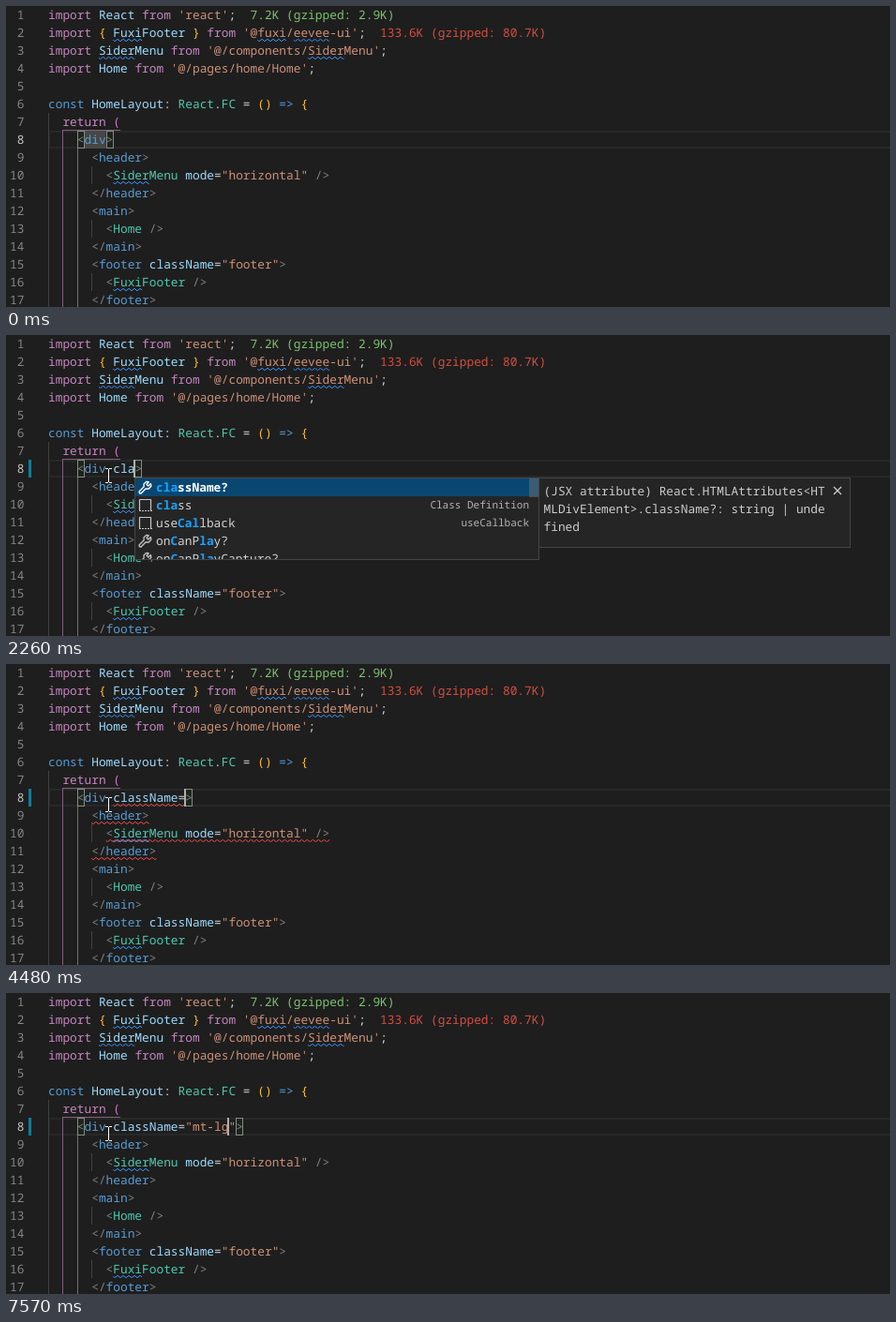
An HTML page with a canvas that plays this animation: 943x321 px, repeating every 8000 ms.

```html
<!DOCTYPE html>
<html lang="en">
<head>
<meta charset="utf-8">
<title>Code editor</title>
<style>
  html, body { margin: 0; width: 100%; height: 100%; overflow: hidden; background: #1e1e1e; }
  canvas { display: block; }
</style>
</head>
<body>
<canvas id="stage" width="943" height="321"></canvas>
<script>
const ctx = document.getElementById('stage').getContext('2d');
ctx.textRendering = 'geometricPrecision';

const LOOP = 8000, ROW = 19, LEFT = 45, CHAR = 7.698, ACTIVE = 7, LIST_WIDTH = 431;
const MONO = '12.83px "Noto Sans Mono", monospace';
const SMALL = '11px "Noto Sans Mono", monospace';
const SANS = '13.4px "Open Sans", sans-serif';
const RED = '#f14c4c', BLUE = '#3794ff';

// "~x" switches to the colour with key x
const COLORS = {
  w: '#d4d4d4', p: '#c586c0', v: '#9cdcfe', s: '#ce9178', k: '#569cd6', t: '#4ec9b0',
  g: '#808080', y: '#ffc029', o: '#da70d6', G: '#7cc36e', R: '#d44e40'
};
const CODE = [
  "~pimport ~vReact ~pfrom ~s'react'~w;  ~G7.2K (gzipped: 2.9K)",
  "~pimport ~y{ ~vFuxiFooter ~y} ~pfrom ~s'@fuxi/eevee-ui'~w;  ~R133.6K (gzipped: 80.7K)",
  "~pimport ~vSiderMenu ~pfrom ~s'@/components/SiderMenu'~w;",
  "~pimport ~vHome ~pfrom ~s'@/pages/home/Home'~w;",
  "",
  "~kconst ~vHomeLayout~w: ~tReact~w.~tFC ~w= ~y() ~k=> ~y{",
  "~w  ~preturn ~o(",
  "",
  "~w      ~g<~kheader~g>",
  "~w        ~g<~tSiderMenu ~vmode~w=~s\"horizontal\" ~g/>",
  "~w      ~g</~kheader~g>",
  "~w      ~g<~kmain~g>",
  "~w        ~g<~tHome ~g/>",
  "~w      ~g</~kmain~g>",
  "~w      ~g<~kfooter ~vclassName~w=~s\"footer\"~g>",
  "~w        ~g<~tFuxiFooter ~g/>",
  "~w      ~g</~kfooter~g>"
];

// "*" toggles the matched part of a label
const CLASS_LIST = [
  ['wrench', '*cla*ssName?'],
  ['snippet', '*cla*ss', 'Class Definition'],
  ['snippet', 'use*Cal*lback', 'useCallback'],
  ['wrench', 'on*C*anP*la*y?'],
  ['wrench', 'on*C*anP*la*yCapture?']
];
const EXACT_LIST = [
  ['snippet', '*class*', 'Class Definition'],
  ['wrench', '*class*Name?']
];
const marginList = mark => ['lg', 'md', 'sm', 'xs', 'xss'].map(size => ['wrench', mark + '-' + size]);

const JSX_INFO = { width: 333, height: 75, font: MONO, close: true, lines: [
  '(JSX attribute) React.HTMLAttributes<HT', 'MLDivElement>.className?: string | unde', 'fined'] };
const SNIPPET_INFO = { width: 333, height: 159, font: MONO, close: true, lines: [
  'Class Definition', 'class name {', '  private value : string;', '  constructor(parameters) {', '', '  }', '}'] };
const CSS_INFO = { width: 400, height: 66, font: SANS, lines: ['{', '    margin-top: 24px;', '}'] };

// Each step changes part of the state; "|" in attr is the caret
const STEPS = [
  [0, { attr: '|', caret: false, word: true, edited: false, errors: 0, list: null, info: null, selected: 0, bar: null }],
  [1080, { caret: true }],
  [1600, { attr: ' |', word: false }],
  [1860, { attr: ' ~vc|', edited: true }],
  [1930, { attr: ' ~vcl|' }],
  [2060, { attr: ' ~vcla|' }],
  [2190, { list: CLASS_LIST, bar: [153, 20] }],
  [2260, { info: JSX_INFO }],
  [2460, { attr: ' ~vclas|' }],
  [2530, { attr: ' ~vclass|' }],
  [2660, { list: EXACT_LIST, info: null, bar: null }],
  [2730, { info: SNIPPET_INFO }],
  [3130, { caret: false }],
  [3330, { selected: 1, info: null, errors: 1 }],
  [3400, { info: JSX_INFO }],
  [3600, { attr: ' ~vclassName|', caret: true, list: null, info: null, selected: 0 }],
  [4080, { caret: false }],
  [4410, { attr: ' ~vclassName~w=|', caret: true }],
  [4480, { errors: 2 }],
  [4810, { attr: ' ~vclassName~w=~s"|"' }],
  [4880, { errors: 3 }],
  [4950, { list: marginList('mt'), bar: [194, 20] }],
  [5020, { info: CSS_INFO }],
  [5430, { caret: false }],
  [5700, { errors: 0 }],
  [5910, { attr: ' ~vclassName~w=~s"m|"', caret: true, list: marginList('*m*t'), bar: [168, 65] }],
  [5980, { attr: ' ~vclassName~w=~s"mt|"', list: marginList('*mt*') }],
  [6460, { caret: false }],
  [7020, { caret: true }],
  [7500, { attr: ' ~vclassName~w=~s"mt-lg|"', list: null, info: null }]
];

const colX = col => LEFT + col * CHAR;
const plain = code => code.replace(/~./g, '');

function rect(x, y, w, h, color) {
  ctx.fillStyle = color;
  ctx.fillRect(x, y, w, h);
}

function text(string, x, y, color, font = MONO, align = 'left') {
  ctx.font = font;
  ctx.fillStyle = color;
  ctx.textAlign = align;
  ctx.fillText(string, x, y);
}

function stroke(points, color, width = 1) {
  ctx.strokeStyle = color;
  ctx.lineWidth = width;
  ctx.beginPath();
  points.forEach(([x, y]) => ctx.lineTo(x, y));
  ctx.stroke();
}

function panel(x, y, w, h) {
  rect(x, y, w, h, '#454545');
  rect(x + 1, y + 1, w - 2, h - 2, '#252526');
}

function squiggle(x0, x1, row, color) {
  const top = row * ROW + 16, points = [];
  for (let i = -1; i * 3 < x1 - x0 + 6; i++) points.push([x0 + 1.75 + i * 3, top + (i & 1 ? 0.3 : 2.7)]);
  ctx.save();
  ctx.beginPath();
  ctx.rect(x0, top, x1 - x0, 3);
  ctx.clip();
  stroke(points, color);
  ctx.restore();
}

function codeLine(code, row) {
  let col = 0;
  for (const part of code.split('~').slice(1)) {
    const token = part.slice(1);
    text(token, colX(col), row * ROW + 14, COLORS[part[0]]);
    col += token.length;
  }
  const visible = plain(code);
  for (const m of visible.matchAll(/Sider|[Ff]uxi|eevee/g))
    squiggle(colX(m.index), colX(m.index + m[0].length), row, BLUE);
}

function guides() {
  rect(45, 6 * ROW, 1, 207, '#404040');
  rect(76, 8 * ROW, 1, 169, '#707070');
  for (const row of [9, 12, 15]) rect(91, row * ROW, 1, ROW, '#404040');
  rect(60, 132, 1, 189, '#80607a');
  rect(60, 132, 62, 1, '#80607a');
}

function bracketBox(col) {
  const x = Math.round(colX(col));
  rect(x, 133, 8, ROW, 'rgba(0,100,0,0.1)');
  ctx.strokeStyle = '#888';
  ctx.lineWidth = 1;
  ctx.strokeRect(x + 0.5, 133.5, 7, 18);
}

function errorMarks(level, caretX) {
  if (level) squiggle(colX(9), caretX, ACTIVE, RED);
  if (level < 2) return;
  for (let row = 8; row < (level === 2 ? 11 : CODE.length); row++) {
    const line = plain(CODE[row]);
    const start = level === 2 || row === 8 ? line.search(/\S/) : 0;
    squiggle(colX(start), colX(line.length), row, RED);
  }
}

function icon(kind, x, y, color) {
  if (kind === 'snippet') {
    stroke([[x + 1.5, y + 13], [x + 1.5, y + 1.5], [x + 13.5, y + 1.5], [x + 13.5, y + 13]], color, 1.2);
    for (let i = 1; i < 14; i += 3) rect(x + i, y + 13, 2, 1, color);
    return;
  }
  ctx.lineJoin = 'round';
  stroke([[x + 11.5, y + 1.6], [x + 8.6, y + 1.4], [x + 6, y + 4], [x + 6.2, y + 6.8], [x + 1, y + 12],
    [x + 1.4, y + 13.8], [x + 3, y + 14], [x + 8.2, y + 8.8], [x + 11.3, y + 9], [x + 13.8, y + 6.2],
    [x + 13.4, y + 3.6], [x + 10.8, y + 6], [x + 9, y + 4.2], [x + 11.5, y + 1.6]], color, 1.3);
}

function suggestions({ list, selected, bar }, x) {
  const bottom = Math.min(240, 154 + list.length * ROW);
  panel(x, 152, LIST_WIDTH + 1, bottom - 152);
  ctx.save();
  ctx.beginPath();
  ctx.rect(x + 1, 153, LIST_WIDTH - 1, bottom - 154);
  ctx.clip();
  list.forEach(([kind, label, note = ''], i) => {
    const y = 153 + i * ROW, focused = i === selected;
    if (focused) rect(x, y, LIST_WIDTH, ROW, '#094771');
    icon(kind, x + 4, y + 2, focused ? '#fff' : '#c5c5c5');
    let col = 0;
    label.split('*').forEach((part, j) => {
      const match = j % 2;
      text(part, x + 23 + col * CHAR, y + 14, match ? '#18a3ff' : focused ? '#fff' : '#d4d4d4',
        match || focused ? 'bold ' + MONO : MONO);
      col += part.length;
    });
    text(note, x + 421, y + 13, '#b4b4b4', SMALL, 'right');
  });
  if (bar) rect(x + LIST_WIDTH - 10, bar[0], 10, bar[1], bar[0] === 194 ? 'rgba(121,121,121,0.15)' : 'rgba(121,121,121,0.45)');
  ctx.restore();
}

function details({ width, height, font, close, lines }, x) {
  panel(x, 152, width, height);
  lines.forEach((line, i) => text(line, x + 5.5, 171 + i * ROW, '#ccc', font));
  if (!close) return;
  const cx = x + 319;
  stroke([[cx - 4, 162], [cx + 4, 170]], '#ccc', 1.2);
  stroke([[cx + 4, 162], [cx - 4, 170]], '#ccc', 1.2);
}

function pointer(t) {
  if (t < 130) return;
  const k = Math.min(11, Math.floor((t - 130) / 68)) / 11;
  const rest = (1 - k) ** 2;
  const x = Math.round(109 + 369 * rest), y = Math.round(142 + 119 * rest);
  rect(x, y + 1, 1, 14, '#fff');
  for (const end of [y, y + 15]) {
    rect(x - 3, end, 3, 1, '#fff');
    rect(x + 1, end, 3, 1, '#fff');
  }
}

function draw(t) {
  const state = Object.assign({}, ...STEPS.filter(([at]) => at <= t).map(([, change]) => change));
  const marked = '~w    ~g<~kdiv' + state.attr + '~g>';
  const active = marked.replace('|', '');
  const caretX = colX(plain(marked).indexOf('|'));

  rect(0, 0, 943, 321, '#1e1e1e');
  ctx.strokeStyle = '#282828';
  ctx.lineWidth = 2;
  ctx.strokeRect(46, 134, 910, 17);
  guides();
  if (state.edited) rect(24, 133, 3, ROW, '#0c7d9d');
  if (state.word) rect(colX(5), 133, 3 * CHAR, ROW, 'rgba(87,87,87,0.72)');
  bracketBox(4);
  bracketBox(plain(active).length - 1);
  CODE.forEach((code, row) => {
    text(row + 1, 19.5, row * ROW + 14, row === ACTIVE ? '#c6c6c6' : '#858585', MONO, 'right');
    codeLine(row === ACTIVE ? active : code, row);
  });
  errorMarks(state.errors, caretX);
  if (state.caret) rect(Math.round(caretX) - 1, 133, 2, ROW, '#aeafad');

  const listX = Math.round(caretX);
  if (state.info) details(state.info, listX + LIST_WIDTH);
  if (state.list) suggestions(state, listX);
  pointer(t);
}

function tick() {
  draw(performance.now() % LOOP);
  requestAnimationFrame(tick);
}
tick();
</script>
</body>
</html>
```
